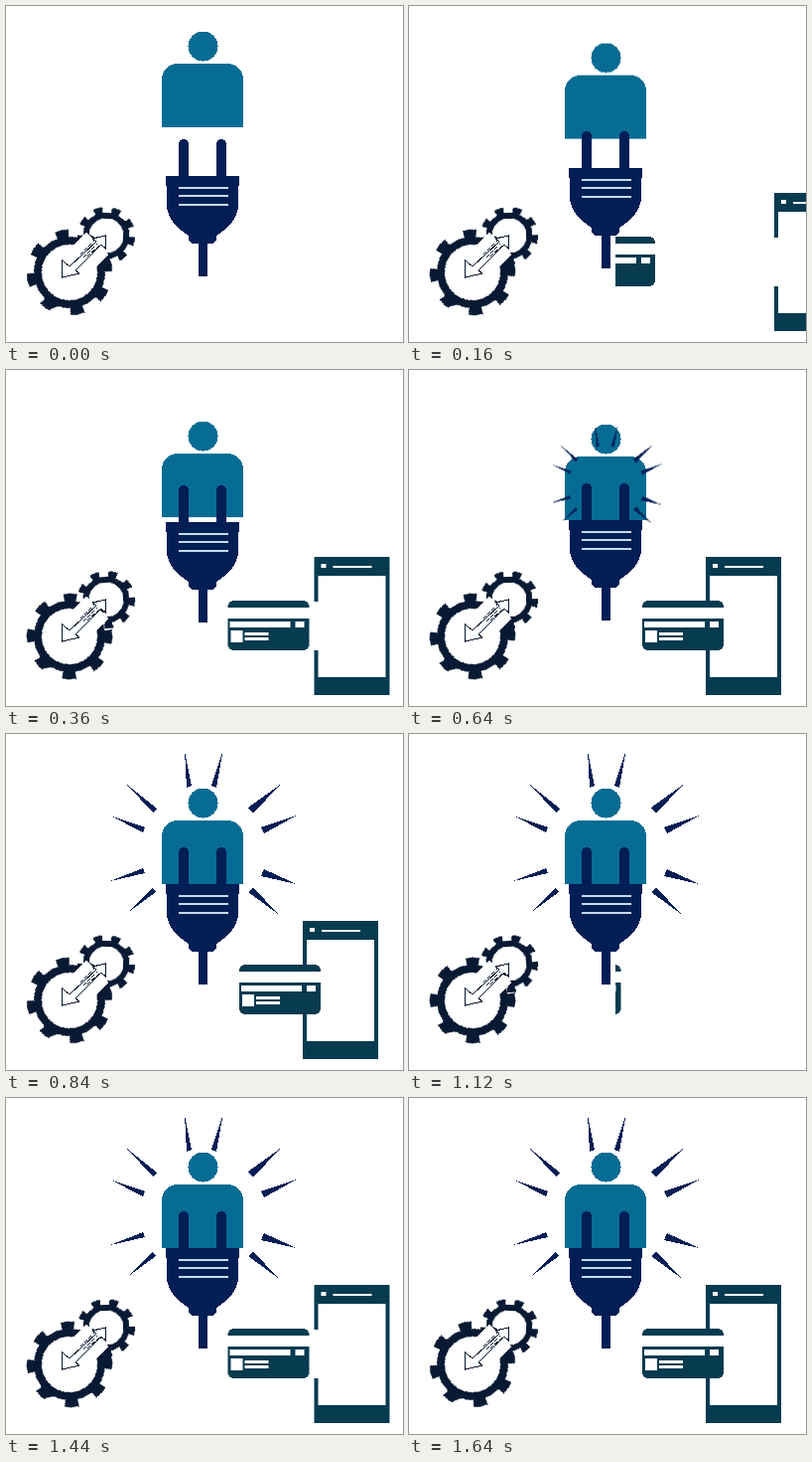
Write an HTML page without scripts that moves like this. It is 400 px wide and 338 px high and loops after 2200 ms.

```html
<!DOCTYPE html>
<html lang="en">
<head>
<meta charset="utf-8">
<title>Plug and pay</title>
<style>
  html, body { margin: 0; width: 100%; height: 100%; overflow: hidden; background: #fff; }
  svg { display: block; width: 400px; height: 338px; shape-rendering: crispEdges; }
  .navy { fill: #011e55; }
  .teal { fill: #076c93; }
  .slate { fill: #063b50; }
  .white { fill: #fff; }
  .gear { fill: none; stroke: #081a33; }
  .arrow { fill: #fff; stroke: #081a33; stroke-width: 1; }

  /* 2200 ms loop on a 40 ms beat, resting after 1640 ms */
  .person, .plug, .rays, .card, .phone, .swing { animation: 2200ms infinite; }
  .person { animation-name: sink; }
  .plug { animation-name: lift; }
  .rays { animation-name: burst; transform-origin: 198.5px 113px; }
  .card { --from: -115px; animation-name: slide; }
  .phone { --from: 115px; animation-name: slide; }
  .swing { animation-name: swing; }
  .big { --turn: 12deg; }
  .small { --turn: -8deg; }

  @keyframes sink {
    0% { transform: none; animation-timing-function: steps(10); }
    18.18%, 100% { transform: translateY(29px); }
  }
  @keyframes lift {
    0% { transform: none; animation-timing-function: steps(10); }
    18.18%, 100% { transform: translateY(-20px); }
  }
  @keyframes burst {
    0%, 18.18% { transform: scale(0); animation-timing-function: steps(10); }
    36.36%, 100% { transform: none; }
  }
  @keyframes slide {
    0%, 49.09% { transform: translateX(var(--from)); animation-timing-function: steps(10); }
    18.18% { transform: none; animation-timing-function: step-end; }
    67.27%, 100% { transform: none; }
  }
  @keyframes swing {
    0%, 37.27% { transform: none; animation-timing-function: ease-out; }
    18.64%, 55.91% { transform: rotate(var(--turn)); animation-timing-function: ease-in; }
    74.54%, 100% { transform: none; }
  }
</style>
</head>
<body>
<svg viewBox="0 0 400 338">
  <clipPath id="slot"><path d="M208 180H400V338H208Z"/></clipPath>

  <g class="gear">
    <g transform="translate(64 268) rotate(24.5)">
      <g class="swing big">
        <circle r="32" stroke-width="8"/>
        <circle r="39.2" stroke-width="8" pathLength="800" stroke-dasharray="42 58"/>
      </g>
    </g>
    <g transform="translate(101 231) rotate(3)">
      <g class="swing small">
        <circle r="20.5" stroke-width="6"/>
        <circle r="26" stroke-width="6" pathLength="900" stroke-dasharray="46 54"/>
      </g>
    </g>
  </g>
  <path d="M65 266L92 239" stroke="#fff" stroke-width="32"/>
  <g class="arrow">
    <path d="M56.5 256V273L74 269L70 266L96 240L100.5 244V231L87 234L91 237L64 262Z"/>
    <path d="M75 250L89 236M78 253L92 239M82 252L94 241" stroke-dasharray="4 2"/>
  </g>

  <g class="person teal">
    <circle cx="198.5" cy="40.5" r="15"/>
    <path d="M157 122V74A16 16 0 0 1 173 58H223A16 16 0 0 1 239 74V122Z"/>
  </g>

  <g class="plug navy">
    <rect x="174" y="134" width="10" height="45" rx="5"/>
    <rect x="212" y="134" width="10" height="45" rx="5"/>
    <path d="M161 171H235V181H234V199C234 214 224 223 212 231V236L208 239H203V272H194V239H188L184 236V231C172 223 162 214 162 199V181H161Z"/>
    <path d="M174 183H224M174 191H224M174 200H224" stroke="#c5dbe8" stroke-width="2"/>
  </g>

  <path class="rays navy" d="M122 51L152 75L148 79ZM105 82L140 94L138 99ZM105 148L138 135L140 140ZM121 181L148 155L151 159Z
    M180 17L187 52L182 54ZM218.500 17L212 54L207 52ZM276 51L249 80L244 74ZM292.500 82L260 100L257 94ZM292.500 151L257 143L260 136ZM274 181L244 159L249 154Z"/>

  <g clip-path="url(#slot)">
    <g class="phone">
      <path class="slate" fill-rule="evenodd" d="M299 188H375V327H299V282H303V309H371V207H303V233H299Z"/>
      <path class="white" d="M306 195h5v4h-5zM318 197h39v2h-39z"/>
    </g>
    <g class="card">
      <rect class="slate" x="235" y="232" width="82" height="50" rx="6"/>
      <path class="white" d="M234 239h84v11h-84zM237 253h61v6h-61zM303 253h9v6h-9zM238 262h12v12h-12zM252 264h24v3h-24zM252 269h24v3h-24z"/>
    </g>
  </g>
</svg>
</body>
</html>
```
